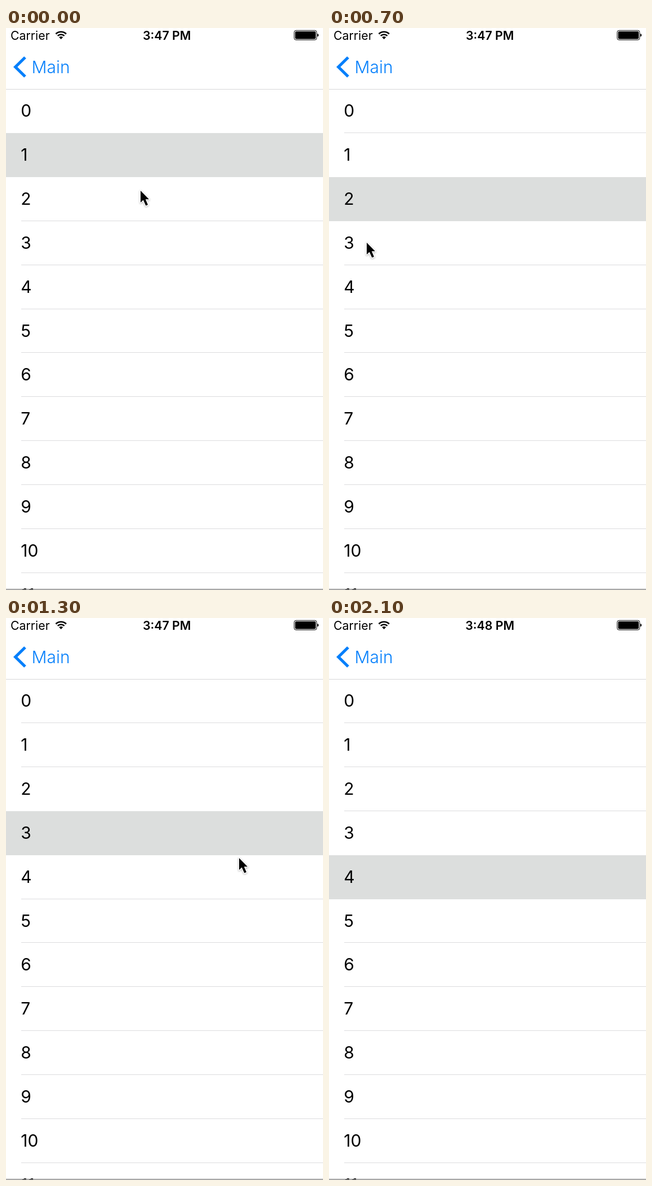
Animation, 563 px wide and 995 px high, one loop 2.4 s. Source, as an HTML page:

```html
<!DOCTYPE html>
<html lang="en">
<head>
<meta charset="utf-8">
<title>Ripple list</title>
<style>
  html, body { margin: 0; width: 100%; height: 100%; overflow: hidden; background: #fff; }
  svg { display: block; width: 100%; height: 100%; }
  text { font-family: Inter, "Liberation Sans", sans-serif; }
  .row { font-size: 30px; }
  .status { font-size: 21.3px; }
  .time { font-weight: 600; text-anchor: middle; }
  .back { font-size: 30px; font-weight: 300; fill: #047ffb; }
  .sep { fill: #dcdcde; }
  .ink { fill: #dcdedd; }
  #cursor { filter: drop-shadow(0 1.5px 1.5px rgba(0, 0, 0, .3)); }
</style>
</head>
<body>
<svg viewBox="0 0 563 995" preserveAspectRatio="none">
  <clipPath id="rowClip"><rect id="clipRect" width="563" height="78"/></clipPath>
  <rect id="selected" class="ink" width="563" height="78"/>
  <circle id="ripple" class="ink" clip-path="url(#rowClip)"/>
  <g id="list"></g>

  <rect y="108" width="563" height="1" fill="#d6d6d8"/>
  <path d="M34 52L16.7 69L34 86" fill="none" stroke="#047ffb" stroke-width="5.2"/>
  <text class="back" x="45.5" y="80">Main</text>

  <text class="status" x="8" y="20.8">Carrier</text>
  <g transform="translate(97.7 20)">
    <path d="M-9.2 -9.5A13.2 13.2 0 0 1 9.2 -9.5M-5.9 -6.1A8.5 8.5 0 0 1 5.9 -6.1" fill="none" stroke="#000" stroke-width="2.7"/>
    <path d="M0 0L-3.5 -3.7A5.1 5.1 0 0 1 3.5 -3.7Z"/>
  </g>
  <text id="clock" class="status time" x="285.7" y="20.8"></text>
  <rect x="511.8" y="4.3" width="40" height="16.8" rx="3.2" fill="none" stroke="#000"/>
  <rect x="513.5" y="6" width="36.6" height="13.4" rx="1.8"/>
  <path d="M553 10Q555.2 10.4 555.2 12.7T553 15.4Z"/>

  <rect y="993" width="563" height="1.5" fill="#858585"/>
  <path id="cursor" d="M0 0V21L4.8 16.6L9.3 26.5L13 25L8.8 15.3H15Z"
        stroke="#fff" stroke-width="3" stroke-linejoin="round" paint-order="stroke"/>
</svg>
<script>
const LOOP = 2400, STEP = 100, PITCH = 77.88, WIDTH = 563, GROWTH = 0.284;
const $ = id => document.getElementById(id);
const rowTop = row => Math.round(108.2 + PITCH * row);

const taps = [
  { row: 2, at: 100, x: 238, y: 292 },
  { row: 3, at: 800, x: 67, y: 381 },
  { row: 4, at: 1700, x: 435, y: 457 }
];

// time, x, y of the pointer tip
const path = [
  [0, 239, 288], [200, 237, 288], [300, 237, 288], [500, 193, 378],
  [600, 110, 382], [700, 67, 380], [1000, 67, 380], [1200, 410, 427],
  [1300, 414, 425], [1500, 435, 454], [1900, 435, 454], [2100, 600, 470]
];

function add(tag, attrs, text = "") {
  const el = document.createElementNS("http://www.w3.org/2000/svg", tag);
  for (const key in attrs) el.setAttribute(key, attrs[key]);
  el.textContent = text;
  return $("list").appendChild(el);
}

const seps = [];
for (let i = 0; i < 12; i++) {
  add("text", { class: "row", x: 26.2, y: 157.2 + PITCH * i }, i);
  seps.push(add("rect", { class: "sep", x: 27, y: rowTop(i + 1) - 1, width: 536, height: 1 }));
}

function pointer(t) {
  const next = path.findIndex(p => p[0] > t);
  if (next < 0) return path[path.length - 1].slice(1);
  const [t0, x0, y0] = path[next - 1], [t1, x1, y1] = path[next];
  const k = (t - t0) / (t1 - t0);
  return [x0 + (x1 - x0) * k, y0 + (y1 - y0) * k];
}

function draw(t) {
  const tap = taps.filter(p => p.at <= t).pop();
  const steps = tap ? (t - tap.at) / STEP : 0;
  const previous = tap ? tap.row - 1 : 1;
  const pressed = tap ? tap.row : previous;

  // The old row stays lit until the new ripple starts.
  const held = steps === 0;
  $("selected").setAttribute("visibility", held ? "visible" : "hidden");
  $("selected").setAttribute("y", rowTop(previous));

  let radius = 0;
  if (tap) {
    const top = rowTop(tap.row);
    const dx = Math.max(tap.x, WIDTH - tap.x);
    const dy = Math.max(tap.y - top, top + 78 - tap.y);
    radius = Math.hypot(dx, dy) * Math.min(1, GROWTH * steps);
    $("clipRect").setAttribute("y", top);
    $("ripple").setAttribute("cx", tap.x);
    $("ripple").setAttribute("cy", tap.y);
  }
  $("ripple").setAttribute("r", radius);

  const lit = held ? [previous, pressed] : [pressed];
  seps.forEach((sep, i) => {
    const hide = lit.some(row => i === row || i === row - 1);
    sep.setAttribute("visibility", hide ? "hidden" : "visible");
  });

  $("cursor").setAttribute("transform", `translate(${pointer(t)})`);
  $("clock").textContent = t < 2000 ? "3:47 PM" : "3:48 PM";
}

const start = performance.now();
function tick() {
  const t = (performance.now() - start) % LOOP;
  draw(Math.floor(t / STEP) * STEP);
  requestAnimationFrame(tick);
}
tick();
</script>
</body>
</html>
```
